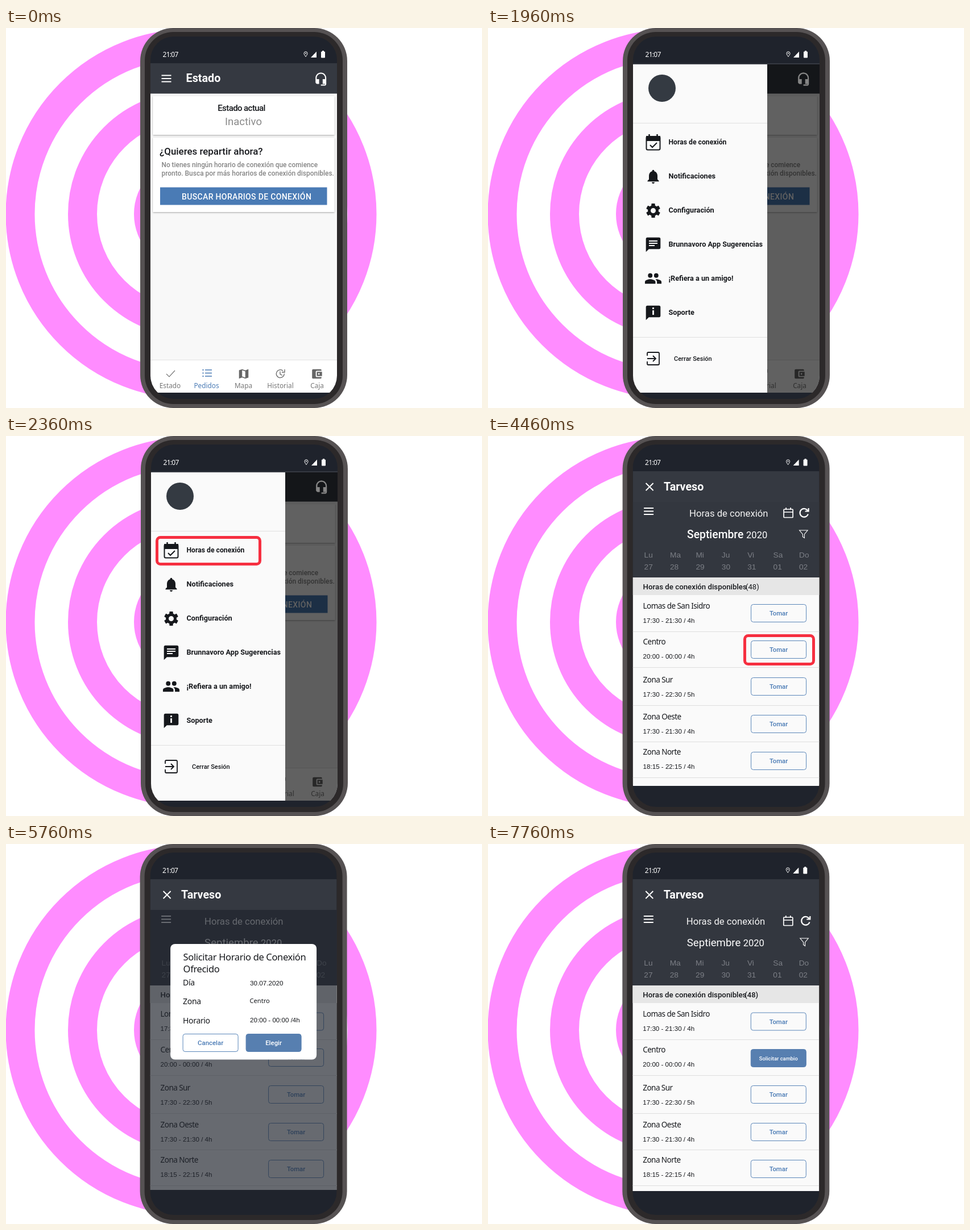
Write an HTML page that moves like this. It is 837x669 px and loops after 9.93 s.

```html
<!DOCTYPE html>
<html lang="es">
<head>
<meta charset="utf-8">
<style>
html, body { margin: 0; width: 100%; height: 100%; overflow: hidden; background: #fff; }
svg { display: block; width: 100vw; height: 100vh; }
.ui { font-family: Roboto, sans-serif; }
.hum { font-family: "Noto Sans", sans-serif; }
.num { font-family: "Liberation Sans", Arial, sans-serif; }
</style>
</head>
<body>
<svg id="stage" viewBox="0 0 837 669"></svg>
<script>
const INK = '#16181c', BLUE = '#4a7bb5', FILL = '#577fb0', BAR = '#353941', DARK = '#1f232c', RED = '#f62f40';

// Drawing helpers
const text = (x, y, str, size, { fill = INK, font = 'ui', weight = 400, gap = 0, anchor = 'start' } = {}) =>
  `<text x="${x}" y="${y}" class="${font}" font-size="${size}" font-weight="${weight}" fill="${fill}" letter-spacing="${gap}" text-anchor="${anchor}">${str}</text>`;
const rect = (x, y, w, h, fill, extra = '') =>
  `<rect x="${x}" y="${y}" width="${w}" height="${h}" fill="${fill}" ${extra}/>`;
const line = (d, stroke, width = 1, extra = '') =>
  `<path d="${d}" fill="none" stroke="${stroke}" stroke-width="${width}" ${extra}/>`;
const icon = (cx, cy, scale, d, fill = INK) =>
  `<path transform="translate(${cx} ${cy}) scale(${scale}) translate(-12 -12)" d="${d}" fill="${fill}" fill-rule="evenodd"/>`;
const button = (x, y, label, { filled = false, size = 11.4 } = {}) =>
  rect(x + .5, y, 97, 31, filled ? FILL : 'none', `rx="4" stroke="${filled ? FILL : '#5a86b9'}"`) +
  text(x + 49, y + 19.5, label, size, { fill: filled ? '#fff' : BLUE, weight: 500, anchor: 'middle' });
const burger = (y, color = '#fff') => line(`M273.5 ${y - 5.5}h17m-17 5.5h17m-17 5.5h17`, color, 2);
const highlight = (x, y, w, h) =>
  rect(x + 2.5, y + 2.5, w - 5, h - 5, 'none', `rx="6" stroke="${RED}" stroke-width="5"`);

const paths = {
  headset: 'M12 1c-4.97 0-9 4.03-9 9v7c0 1.66 1.34 3 3 3h3v-8H5v-2c0-3.87 3.13-7 7-7s7 3.13 7 7v2h-4v8h4v1h-7v2h6c1.66 0 3-1.34 3-3V10c0-4.97-4.03-9-9-9z',
  bell: 'M12 22c1.1 0 2-.9 2-2h-4c0 1.1.9 2 2 2zm6-6v-5c0-3.07-1.64-5.64-4.5-6.32V4a1.5 1.5 0 0 0-3 0v.68C7.63 5.36 6 7.92 6 11v5l-2 2v1h16v-1z',
  bubble: 'M20 2H4a2 2 0 0 0-2 2v18l4-4h14a2 2 0 0 0 2-2V4a2 2 0 0 0-2-2z',
  people: 'M16 11a3 3 0 1 0 0-6 3 3 0 0 0 0 6zM8 11a3 3 0 1 0 0-6 3 3 0 0 0 0 6zm0 2c-2.33 0-7 1.17-7 3.5V19h14v-2.5c0-2.33-4.67-3.5-7-3.5zm8 0l-1 .05c1.2.84 2 1.97 2 3.45V19h6v-2.5c0-2.33-4.67-3.5-7-3.5z',
  map: 'M20.5 3L15 5.1 9 3 3 5v16l6-2.1 6 2.1 6-2V3zM15 19l-6-2.1V5l6 2.1z',
  wallet: 'M21 18v1a2 2 0 0 1-2 2H5a2 2 0 0 1-2-2V5a2 2 0 0 1 2-2h14a2 2 0 0 1 2 2v1h-9a2 2 0 0 0-2 2v8a2 2 0 0 0 2 2zm-9-2h10V8H12zm4-2.5a1.5 1.5 0 1 1 0-3 1.5 1.5 0 0 1 0 3z'
};

const rings = () => [[300.5, 51], [191, 51], [75, 51]].map(([r, w]) =>
  `<circle cx="325.5" cy="327.5" r="${r}" fill="none" stroke="#ff8cff" stroke-width="${w}"/>`).join('');

const statusIcons = () =>
  line('M527 50.5c-2-3-3-4-3-5.800a3 3 0 0 1 6 0c0 1.800-1 2.800-3 5.800z', '#fff') +
  '<circle cx="527" cy="44.700" r="1" fill="#fff"/><path d="M546 41.500V52h-10z" fill="#fff"/>' +
  rect(554, 41.5, 7, 11, '#fff', 'rx="1"') + rect(556, 40, 3, 3, '#fff');

const phone = (content, { shift = 0, icons = true } = {}) => `<g transform="translate(${shift})">
  ${rect(236, 0, 364, 669, '#565253', 'rx="58"')}${rect(244, 7, 348, 655, '#2c292a', 'rx="50"')}
  <g clip-path="url(#screen)">${rect(254, 15, 328, 638, DARK)}
  ${text(275.5, 51, '21:07', 12, { fill: '#fff', font: 'hum', gap: -.7 })}${icons ? statusIcons() : ''}${content}</g></g>`;

const tab = (x, label, color = '#777') => text(x, 633.5, label, 11.8, { fill: color, font: 'hum', anchor: 'middle' });

function home() {
  const note = { fill: '#858585', weight: 500 };
  return rect(254, 62, 328, 54, BAR) + rect(254, 115.5, 328, 470, '#f8f8f8') +
    burger(89) + text(316.5, 95, 'Estado', 19.8, { fill: '#fff', weight: 600 }) +
    icon(553.7, 90, 1.05, paths.headset, '#fff') +
    rect(258.5, 120, 319, 68, '#fff', 'filter="url(#soft)"') +
    rect(258.5, 193, 319, 131, '#fff', 'filter="url(#soft)"') +
    text(414, 146, 'Estado actual', 15, { weight: 500, gap: -.6, anchor: 'middle' }) +
    text(417.5, 171, 'Inactivo', 18.5, { fill: '#8a8a8a', anchor: 'middle' }) +
    text(270, 223, '¿Quieres repartir ahora?', 16.9, { weight: 500 }) +
    text(273.5, 245, 'No tienes ningún horario de conexión que comience', 11.85, note) +
    text(273.5, 260, 'pronto. Busca por más horarios de conexión disponibles.', 11.95, note) +
    rect(271, 280.5, 293.5, 31, BLUE) +
    text(309, 301.5, 'BUSCAR HORARIOS DE CONEXIÓN', 14, { fill: '#fff', weight: 500, gap: .35 }) +
    rect(254, 584, 328, 58, '#fff') + line('M254 584.5h328', '#e3e3e3') +
    line('M282 609l5 5 10-11', '#777', 1.2) +
    line('M350 602h12m-12 5.500h12m-12 5.500h12', BLUE, 1.3) +
    line('M345.500 602h2m-2 5.500h2m-2 5.500h2', BLUE, 2) +
    icon(418, 609, .92, paths.map, '#666') +
    line('M487 603.500a7 7 0 1 0 2.300 5M490 601v5h-5M482 604.500v5l4 2', '#666', 1.3) +
    icon(546.5, 609, .92, paths.wallet, '#666') +
    tab(288.5, 'Estado') + tab(352.5, 'Pedidos', BLUE) + tab(417.5, 'Mapa') + tab(482.5, 'Historial') + tab(547, 'Caja');
}

function menu() {
  const items = ['Horas de conexión', 'Notificaciones', 'Configuración', 'Brunnavoro App Sugerencias', '¡Refiera a un amigo!', 'Soporte'];
  const teeth = [0, 60, 120, 180, 240, 300].map(a => rect(-3.2, -12.5, 6.4, 6, INK, `rx="1" transform="rotate(${a})"`)).join('');
  return home() + rect(254, 64, 328, 578, '#000', 'opacity=".62"') +
    icon(553.7, 90, 1.05, paths.headset, '#858585') +
    rect(254, 64, 236, 578, '#fafafa') + line('M254 167.500h236M254 544.500h236', '#e0e0e0') +
    '<circle cx="305" cy="106" r="24" fill="#343a42"/>' +
    items.map((s, i) => text(316.5, 205.3 + i * 60, s, i ? 12.7 : 12.2, { weight: 700 })).join('') +
    rect(277.5, 191, 24, 23.5, 'none', `rx="2.5" stroke="${INK}" stroke-width="2"`) + rect(277, 190, 25, 9, INK) +
    line('M282.500 187v5m14-5v5', INK, 2.5) + line('M284 206l4 4 8-8', INK, 2) +
    icon(289.5, 261.5, 1.25, paths.bell) +
    `<g transform="translate(289.500 321.500)">${teeth}<circle r="7" fill="none" stroke="${INK}" stroke-width="5"/></g>` +
    icon(289.5, 381.5, 1.28, paths.bubble) + line('M282 375h15m-15 4h15m-15 4h10', '#fafafa', 2) +
    icon(289.5, 441, 1.32, paths.people) +
    icon(289.5, 501.5, 1.28, paths.bubble) + line('M289.500 492v3m0 2v8', '#fafafa', 2.8) +
    line('M279 577v-4q0-2 2-2h17q2 0 2 2v18q0 2-2 2h-17q-2 0-2-2v-4M279 582h15m-5-5l5 5-5 5', INK, 1.8) +
    text(326, 585.5, 'Cerrar Sesión', 11, { weight: 500 });
}

function shifts({ bottom = 611, titleX = 348.5, month = 400, icons = true, first = 297, taken = false } = {}) {
  const days = ['Lu 27', 'Ma 28', 'Mi 29', 'Ju 30', 'Vi 31', 'Sa 01', 'Do 02'];
  const rows = [
    ['Lomas de San Isidro', '17:30 - 21:30 / 4h', 304, first, 344.5],
    ['Centro', '20:00 - 00:00 / 4h', 367, 360.5, 407.5],
    ['Zona Sur', '17:30 - 22:30 / 5h', 434, 425.5, 474.5],
    ['Zona Oeste', '17:30 - 21:30 / 4h', 499, 491.5, 538.5],
    ['Zona Norte', '18:15 - 22:15 / 4h', 561, 556.5, 601.5]];
  const bold = month > 400, dayStyle = { fill: '#7c7f86', font: 'num' };
  return rect(254, 62, 328, 187, BAR) + rect(254, 116, 328, 133, '#33373f') +
    rect(254, 249, 328, bottom - 249, '#fafafa') + rect(254, 249, 328, 31, '#e6e6e6') +
    line('M277 83l13 13m0-13l-13 13', '#fff', 1.9) +
    text(308.5, 96, 'Tarveso', 19.7, { fill: '#fff', weight: 600 }) + burger(132.5) +
    text(titleX, 141.5, 'Horas de conexión', 16.7, { fill: '#f4f4f4' }) +
    text(349.5, 179.5, 'Septiembre', bold ? 19.3 : 18.6, { fill: '#fff', weight: month }) +
    text(bold ? 453.5 : 448.5, 179.5, '2020', 16.5, { fill: '#fff' }) +
    (icons ? line('M519.500 130q0-1 1-1h14q1 0 1 1v12.500q0 1-1 1h-14q-1 0-1-1zM519.500 134h16M523.500 126v4m8-4v4', '#fff', 1.7) +
      line('M562 131.500a7.300 7.300 0 1 0 .700 6M563.500 127v5.500h-6', '#fff', 2.2, `transform="translate(${bold ? -.5 : 2.5})"`) +
      line('M547 166h14.500l-5.700 7v6.500l-3-2V173z', '#fff', 1.1, `transform="translate(${bold ? 0 : 1.5})"`) : '') +
    days.map((d, i) => d.split(' ').map((s, k) => text(274 + i * 45.4, 213.5 + k * 21, s, 13.7, dayStyle)).join('')).join('') +
    text(272, 270, 'Horas de conexión disponibles', 13.25, { weight: 500 }) +
    text(bold ? 452.5 : 451, 270, '(48)', 13, { weight: bold ? 400 : 500 }) +
    rows.map(([name, hours, y, top, rule], i) =>
      text(272, y, name, 13.5, { font: 'hum', weight: 500, gap: -.55 }) +
      text(272, y + 24.5, hours, 11.6, { font: 'num' }) +
      (taken && i === 1 ? button(461.5, 361.5, 'Solicitar cambio', { filled: true, size: 9.4 }) : button(461.5, top, 'Tomar')) +
      line(`M254 ${rule}h328`, '#dedede')).join('');
}

function dialog() {
  const head = { font: 'hum', weight: 500, gap: -.35 };
  return shifts({ bottom: 609, titleX: 349.5, icons: false }) +
    rect(254, 116, 328, 493, '#20242d', 'opacity=".67"') +
    rect(289.5, 176, 257, 203.5, '#fff', 'rx="8"') +
    text(312, 205, 'Solicitar Horario de Conexión', 16.5, head) + text(312, 226, 'Ofrecido', 16.5, head) +
    [['Día', 249], ['Zona', 282], ['Horario', 316]].map(([s, y]) => text(311.5, y, s, 14, head)).join('') +
    text(429.5, 249, '30.07.2020', 11.7, { font: 'num' }) +
    text(429, 279.5, 'Centro', 11.1, { font: 'hum' }) +
    text(429.5, 313.5, '20:00 - 00:00 /4h', 11.6, { font: 'num' }) +
    button(311, 334.5, 'Cancelar') + button(422, 334.5, 'Elegir', { filled: true });
}

const scenes = [
  { start: 0, mark: 630, box: [263, 68, 40, 42], art: phone(home()) },
  { start: 1960, mark: 2360, box: [263, 176, 186, 52], art: phone(menu(), { shift: 1 }) },
  { start: 3930, mark: 4460, box: [449, 349, 126, 55], art: phone(shifts({ bottom: 616, titleX: 353.5, month: 500, first: 296.5 }), { shift: .6 }) },
  { start: 5760, mark: 6290, box: [412, 323, 117, 55], art: phone(dialog(), { shift: -.4, icons: false }) },
  { start: 7760, art: phone(shifts({ taken: true }), { shift: .3 }) }
];
const LOOP = 9930;

const stage = document.getElementById('stage');
stage.innerHTML = `<defs>
  <clipPath id="screen"><rect x="254" y="15" width="328" height="638" rx="41"/></clipPath>
  <filter id="soft" x="-5%" y="-10%" width="110%" height="125%"><feDropShadow dx="0" dy="1" stdDeviation="1.500" flood-opacity=".35"/></filter>
  </defs>` + rect(0, 0, 837, 669, '#fff') + rings() +
  scenes.map(s => `<g class="scene">${s.art}<g class="mark">${s.box ? highlight(...s.box) : ''}</g></g>`).join('');

const layers = [...stage.querySelectorAll('.scene')];
const show = (el, on) => { el.style.display = on ? '' : 'none'; };

function draw(now) {
  const t = now % LOOP;
  scenes.forEach((s, i) => {
    const end = i + 1 < scenes.length ? scenes[i + 1].start : LOOP;
    show(layers[i], t >= s.start && t < end);
    show(layers[i].lastElementChild, t >= s.mark);
  });
}
const began = performance.now();
function tick() {
  draw(performance.now() - began);
  requestAnimationFrame(tick);
}
tick();
</script>
</body>
</html>
```
